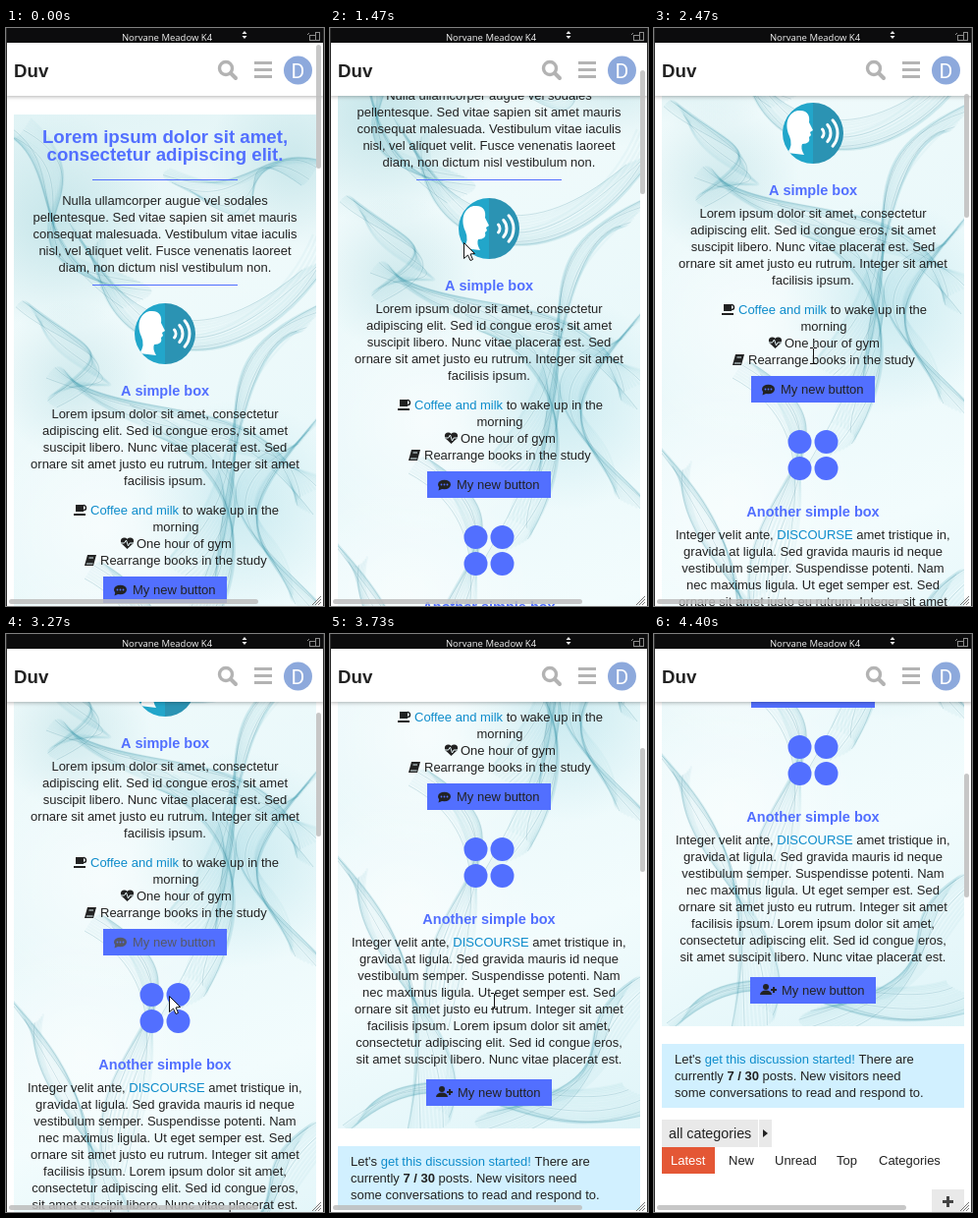
These frames come from a looping animation (324 px wide and 588 px high, 5.19 s). An HTML page with a canvas:

```html
<!DOCTYPE html>
<html lang="en">
<head>
<meta charset="utf-8">
<title>Mobile page preview</title>
<style>
  html, body { margin: 0; width: 100%; height: 100%; overflow: hidden; background: #fff; }
  canvas { display: block; width: 324px; height: 588px; }
</style>
</head>
<body>
<canvas id="stage" width="324" height="588"></canvas>
<script>
const W = 324, H = 588, LOOP = 5190, TICK = 200 / 3;
const BLUE = '#526fff', INK = '#222', LINK = '#0e8ccb';
const SANS = '"Liberation Sans", Arial, sans-serif';
const BODY = `13px ${SANS}`;
const g = document.getElementById('stage').getContext('2d');

// [time, value...] keys, linear in between
const scrollKeys = [[1000, 0], [1130, 45], [1270, 92], [1370, 102], [1430, 102], [1470, 107],
  [1530, 151], [1640, 192], [1740, 204], [3060, 204], [3130, 213], [3270, 258], [3400, 298],
  [3470, 310], [3600, 374], [3730, 406], [3800, 414], [3930, 466], [4070, 502], [4170, 510]];
const pointerKeys = [[530, 322, 158], [670, 262, 166], [800, 190, 178], [1000, 141, 186],
  [1470, 136, 218], [2070, 165, 300], [2470, 162, 333], [2600, 163, 342], [3130, 166, 366],
  [3270, 166, 368], [3730, 167, 373], [4200, 165, 380], [4400, 88, 604]];
const hoverKeys = [[2670, 0], [2870, 1], [3130, 1], [3470, 0]];
const beamSpans = [[665, 1110], [1980, 2650], [3400, 4130]];

function sample(keys, t) {
  if (t <= keys[0][0]) return keys[0].slice(1);
  for (let i = 1; i < keys.length; i++) {
    const a = keys[i - 1], b = keys[i];
    if (t <= b[0]) {
      const k = (t - a[0]) / (b[0] - a[0]);
      return a.slice(1).map((v, j) => v + (b[j + 1] - v) * k);
    }
  }
  return keys[keys.length - 1].slice(1);
}

function rect(x, y, w, h, color) {
  g.fillStyle = color;
  g.fillRect(x, y, w, h);
}
function disc(x, y, r, color) {
  g.fillStyle = color;
  g.beginPath();
  g.arc(x, y, r, 0, 7);
  g.fill();
}
function poly(points, color, outline) {
  g.beginPath();
  points.forEach(([x, y]) => g.lineTo(x, y));
  g.closePath();
  g.fillStyle = color;
  g.fill();
  if (outline) {
    g.strokeStyle = outline;
    g.lineWidth = 1;
    g.stroke();
  }
}
function line(x1, y1, x2, y2, color, width = 1) {
  g.strokeStyle = color;
  g.lineWidth = width;
  g.beginPath();
  g.moveTo(x1, y1);
  g.lineTo(x2, y2);
  g.stroke();
}
function text(str, x, y, { font = BODY, color = INK, align = 'left' } = {}) {
  g.font = font;
  g.fillStyle = color;
  g.textAlign = align;
  g.fillText(str, x, y);
  return x + g.measureText(str).width;
}
function paragraph(str, y, step = 17, style = {}) {
  str.split('|').forEach((row, i) => text(row, 162, y + i * step, { align: 'center', ...style }));
}
// runs of [string, style] set one after another
function runs(x, y, parts) {
  for (const [str, style] of parts) x = text(str, x, y, style);
}

function makeSmoke() {
  const c = document.createElement('canvas');
  c.width = 308;
  c.height = 821;
  const p = c.getContext('2d');
  const base = p.createLinearGradient(0, 0, 308, 821);
  ['#e0f3f5', '#effafb', '#e9f8fa', '#f2fcfd', '#dff4f8'].forEach((s, i) => base.addColorStop(i / 4, s));
  p.fillStyle = base;
  p.fillRect(0, 0, 308, 821);

  const cloud = (x, y, r, rgb, alpha) => {
    const s = p.createRadialGradient(x, y, 0, x, y, r);
    s.addColorStop(0, `rgba(${rgb},${alpha})`);
    s.addColorStop(1, `rgba(${rgb},0)`);
    p.fillStyle = s;
    p.fillRect(x - r, y - r, 2 * r, 2 * r);
  };
  cloud(45, 110, 110, '120,190,200', .3);
  cloud(285, 50, 90, '120,190,200', .28);
  cloud(230, 400, 110, '125,200,215', .28);
  cloud(60, 270, 80, '125,190,200', .25);
  cloud(90, 420, 130, '255,255,255', .6);
  cloud(70, 600, 130, '255,255,255', .5);

  // start, two controls, end, spread
  const ribbons = [
    [0, 10, 90, 70, -30, 130, 120, 180, 34],
    [308, 60, 230, 20, 260, 120, 170, 70, 30],
    [15, 200, 60, 250, 130, 260, 50, 285, 26],
    [75, 120, 110, 260, 230, 250, 308, 140, 36],
    [308, 205, 190, 250, 250, 390, 180, 470, 40],
    [50, 270, 130, 330, 240, 300, 308, 390, 34],
    [140, 310, 250, 360, 230, 430, 170, 540, 44],
    [300, 320, 180, 410, 280, 440, 308, 510, 42],
    [90, 470, 190, 540, 110, 610, 110, 700, 36],
    [10, 550, 40, 640, 120, 690, 90, 821, 40],
    [20, 810, 110, 730, 200, 830, 308, 790, 30],
    [308, 680, 240, 730, 300, 790, 160, 815, 34]
  ];
  const strands = 24;
  ribbons.forEach(([x0, y0, x1, y1, x2, y2, x3, y3, spread], n) => {
    for (let i = 0; i < strands; i++) {
      const u = i / (strands - 1) - .5;
      const a = u * spread, b = Math.sin(u * 5 + n) * spread, d = Math.cos(u * 4 + n * 2) * spread;
      p.beginPath();
      p.moveTo(x0 + a, y0 + d * .4);
      p.bezierCurveTo(x1 + b, y1 + a, x2 - b, y2 + d, x3 + d * .6, y3 - a);
      p.lineWidth = i % 6 ? 2.2 : 1;
      p.strokeStyle = i % 6 ? 'rgba(70,160,180,.05)' : 'rgba(45,125,145,.2)';
      p.stroke();
    }
  });
  return c;
}
const smoke = makeSmoke();

function speakerBadge() {
  g.save();
  g.beginPath();
  g.arc(162, 311, 31, 0, 7);
  g.clip();
  rect(131, 280, 31, 62, '#22a6ca');
  rect(162, 280, 31, 62, '#2b93b3');
  g.fillStyle = '#fff';
  g.beginPath();
  g.moveTo(136, 331);
  g.quadraticCurveTo(142, 323, 138, 314);
  g.bezierCurveTo(131, 298, 140, 287, 149, 288);
  g.bezierCurveTo(157, 288, 159, 294, 158, 300);
  g.lineTo(162, 308);
  g.lineTo(159, 310);
  g.lineTo(160, 313);
  g.lineTo(158, 315);
  g.quadraticCurveTo(160, 322, 151, 322);
  g.quadraticCurveTo(149, 326, 153, 333);
  g.closePath();
  g.fill();
  g.strokeStyle = '#fff';
  g.lineWidth = 3;
  g.lineCap = 'round';
  for (const r of [6, 13, 20]) {
    g.beginPath();
    g.arc(167, 311, r, -.72, .72);
    g.stroke();
  }
  g.restore();
}

function cupIcon(x, y) {
  rect(x + 2, y - 6, 8, 7, INK);
  rect(x, y + 3, 12, 2, INK);
  g.strokeStyle = INK;
  g.lineWidth = 1.5;
  g.beginPath();
  g.arc(x + 10, y - 3, 2.5, -1.6, 1.6);
  g.stroke();
}
function heartIcon(x, y) {
  disc(x - 3, y - 2, 3.6, INK);
  disc(x + 3, y - 2, 3.6, INK);
  poly([[x - 6.3, y], [x + 6.3, y], [x, y + 6]], INK);
  g.strokeStyle = '#eaf8fa';
  g.lineWidth = 1;
  g.beginPath();
  [[-7, 0], [-3, 0], [-1, -3], [1, 3], [2.5, 0], [7, 0]].forEach(([a, b]) => g.lineTo(x + a, y + b));
  g.stroke();
}
function bookIcon(x, y) {
  poly([[x + 3, y - 6], [x + 12, y - 6], [x + 9, y + 5], [x, y + 5]], INK);
  line(x + 4.5, y - 3, x + 9, y - 3, '#dff1f4');
  line(x + 2, y + 3, x + 8.5, y + 3, '#dff1f4');
}
function chatIcon(x, y, color) {
  g.fillStyle = color;
  g.beginPath();
  g.ellipse(x, y - .5, 6.5, 4.8, 0, 0, 7);
  g.fill();
  poly([[x - 5, y + 1], [x - 6, y + 5.5], [x, y + 3]], color);
  for (const d of [-3, 0, 3]) disc(x + d, y - .5, .9, BLUE);
}
function personIcon(x, y) {
  disc(x - 2, y - 3, 3, INK);
  g.beginPath();
  g.ellipse(x - 2, y + 5, 6, 4.5, 0, Math.PI, 0);
  g.fill();
  rect(x + 3, y - 1, 6, 2, INK);
  rect(x + 5, y - 3, 2, 6, INK);
}

function page(hover) {
  const title = size => ({ font: `bold ${size}px ${SANS}`, color: BLUE });
  g.drawImage(smoke, 8, 88);
  paragraph('Lorem ipsum dolor sit amet,|consectetur adipiscing elit.', 117, 18, title(18.7));
  rect(88, 154, 148, 1, BLUE);
  paragraph('Nulla ullamcorper augue vel sodales|pellentesque. Sed vitae sapien sit amet mauris|' +
    'consequat malesuada. Vestibulum vitae iaculis|nisl, vel aliquet velit. Fusce venenatis laoreet|' +
    'diam, non dictum nisl vestibulum non.', 180);
  rect(88, 261, 148, 1, BLUE);
  speakerBadge();

  paragraph('A simple box', 374, 17, title(14.5));
  paragraph('Lorem ipsum dolor sit amet, consectetur|adipiscing elit. Sed id congue eros, sit amet|' +
    'suscipit libero. Nunc vitae placerat est. Sed|ornare sit amet justo eu rutrum. Integer sit amet|' +
    'facilisis ipsum.', 397);
  cupIcon(69, 491);
  runs(86, 495, [['Coffee and milk', { color: LINK }], [' to wake up in the']]);
  text('morning', 173, 512, { align: 'center' });
  heartIcon(123.5, 524);
  text('One hour of gym', 133, 529);
  bookIcon(80, 542);
  text('Rearrange books in the study', 96, 546);

  const mix = (a, b) => Math.round(a + (b - a) * hover);
  const label = `rgb(${mix(34, 120)},${mix(34, 125)},${mix(34, 150)})`;
  rect(99, 558, 126, 27, BLUE);
  chatIcon(116.5, 572, label);
  text('My new button', 129, 576, { color: label });

  for (const y of [625, 652]) for (const x of [148.5, 175.5]) disc(x, y, 12, BLUE);

  paragraph('Another simple box', 701, 17, title(14.5));
  runs(22, 724, [['Integer velit ante, '], ['DISCOURSE', { color: LINK }], [' amet tristique in,']]);
  paragraph('gravida at ligula. Sed gravida mauris id neque|vestibulum semper. Suspendisse potenti. Nam|' +
    'nec maximus ligula. Ut eget semper est. Sed|ornare sit amet justo eu rutrum. Integer sit amet|' +
    'facilisis ipsum. Lorem ipsum dolor sit amet,|consectetur adipiscing elit. Sed id congue eros,|' +
    'sit amet suscipit libero. Nunc vitae placerat est.', 741);
  rect(98, 859, 128, 27, BLUE);
  personIcon(116, 872);
  text('My new button', 130, 877);

  rect(8, 927, 308, 65, '#d1f0ff');
  runs(21, 947, [["Let's "], ['get this discussion started!', { color: LINK }], [' There are']]);
  runs(21, 964, [['currently '], ['7 / 30', { font: `bold ${BODY}` }], [' posts. New visitors need']]);
  text('some conversations to read and respond to.', 21, 981);

  rect(8, 1004, 98, 28, '#e9e9e9');
  rect(107, 1004, 13, 28, '#e9e9e9');
  text('all categories', 15, 1023, { font: `14.3px ${SANS}` });
  poly([[111, 1014], [116, 1018], [111, 1022]], INK);
  rect(8, 1032, 54, 27, '#e45735');
  text('Latest', 17, 1050, { color: '#fff' });
  [['New', 76], ['Unread', 123], ['Top', 186], ['Categories', 229]].forEach(([s, x]) => text(s, x, 1050));
  rect(283, 1075, 33, 30, '#e9e9e9');
  rect(294, 1086, 11, 3, '#444');
  rect(298, 1082, 3, 11, '#444');
}

function header() {
  g.save();
  g.shadowColor = 'rgba(0,0,0,.3)';
  g.shadowBlur = 4;
  g.shadowOffsetY = 1;
  rect(0, 15, W, 54, '#fff');
  g.restore();
  text('Duv', 8, 50, { font: `bold 18.7px ${SANS}` });

  g.strokeStyle = '#b3b3b3';
  g.lineWidth = 3.4;
  g.beginPath();
  g.arc(224, 41, 6.5, 0, 7);
  g.stroke();
  g.lineCap = 'round';
  line(229, 46, 234, 51, '#b3b3b3', 4);
  g.lineCap = 'butt';
  for (const y of [34, 41, 48]) rect(253, y, 18, 3, '#b3b3b3');
  disc(297.5, 43, 14.5, '#8da9dc');
  text('D', 297.5, 50.5, { font: '21px Roboto, sans-serif', color: '#fff', align: 'center' });
}

function deviceBar() {
  rect(0, 0, W, 15, '#0c0c0d');
  text('Norvane Meadow K4', 164, 13, { font: '9.5px "Open Sans", sans-serif', color: '#f2f2f2', align: 'center' });
  poly([[240.5, 6], [245.5, 6], [243, 3]], '#eee');
  poly([[240.5, 8], [245.5, 8], [243, 11]], '#eee');
  g.strokeStyle = '#8c8c8c';
  g.lineWidth = 1;
  g.strokeRect(309.5, 7.5, 6, 5);
  g.strokeRect(315.5, 4.5, 4, 8);
  line(307, 7, 309, 5, '#8c8c8c');
}

function chrome(scroll) {
  const bar = 'rgba(190,190,190,.85)';
  g.fillStyle = bar;
  g.beginPath();
  g.roundRect(316, Math.round(17 + scroll * .245), 5, 126, 2.5);
  g.roundRect(3, 581, 254, 5, 2.5);
  g.fill();
  for (const d of [3, 6, 9]) line(321 - d, 587, 321, 587 - d, '#777');
  rect(0, 0, 1, H, '#2a2a2a');
  rect(323, 0, 1, H, '#2a2a2a');
}

function pointer(x, y, beam) {
  x = Math.round(x);
  y = Math.round(y);
  if (beam) {
    rect(x, y - 7, 1, 15, '#111');
    for (const edge of [y - 8, y + 8]) {
      rect(x - 3, edge, 3, 1, '#111');
      rect(x + 1, edge, 3, 1, '#111');
    }
    return;
  }
  const shape = [[0, 0], [0, 16], [4, 12.5], [6.5, 18], [9, 17], [6.5, 11.5], [11, 11]];
  poly(shape.map(([a, b]) => [x + a + .5, y + b + .5]), '#fff', '#111');
}

function draw(t) {
  const [rawScroll] = sample(scrollKeys, t);
  const scroll = Math.round(rawScroll);
  rect(0, 0, W, H, '#fff');
  g.save();
  g.translate(0, -scroll);
  page(sample(hoverKeys, t)[0]);
  g.restore();
  header();
  deviceBar();
  chrome(scroll);
  if (t >= 530 && t < 4395) {
    const [x, y] = sample(pointerKeys, t);
    pointer(x, y, beamSpans.some(([a, b]) => t >= a && t < b));
  }
}

const start = performance.now();
function tick() {
  const t = (performance.now() - start) % LOOP;
  // the picture advances fifteen times a second, on times rounded to 10 ms
  const step = Math.floor((t + 3.4) / TICK);
  draw(Math.round(step * TICK / 10) * 10);
  requestAnimationFrame(tick);
}
tick();
</script>
</body>
</html>
```
